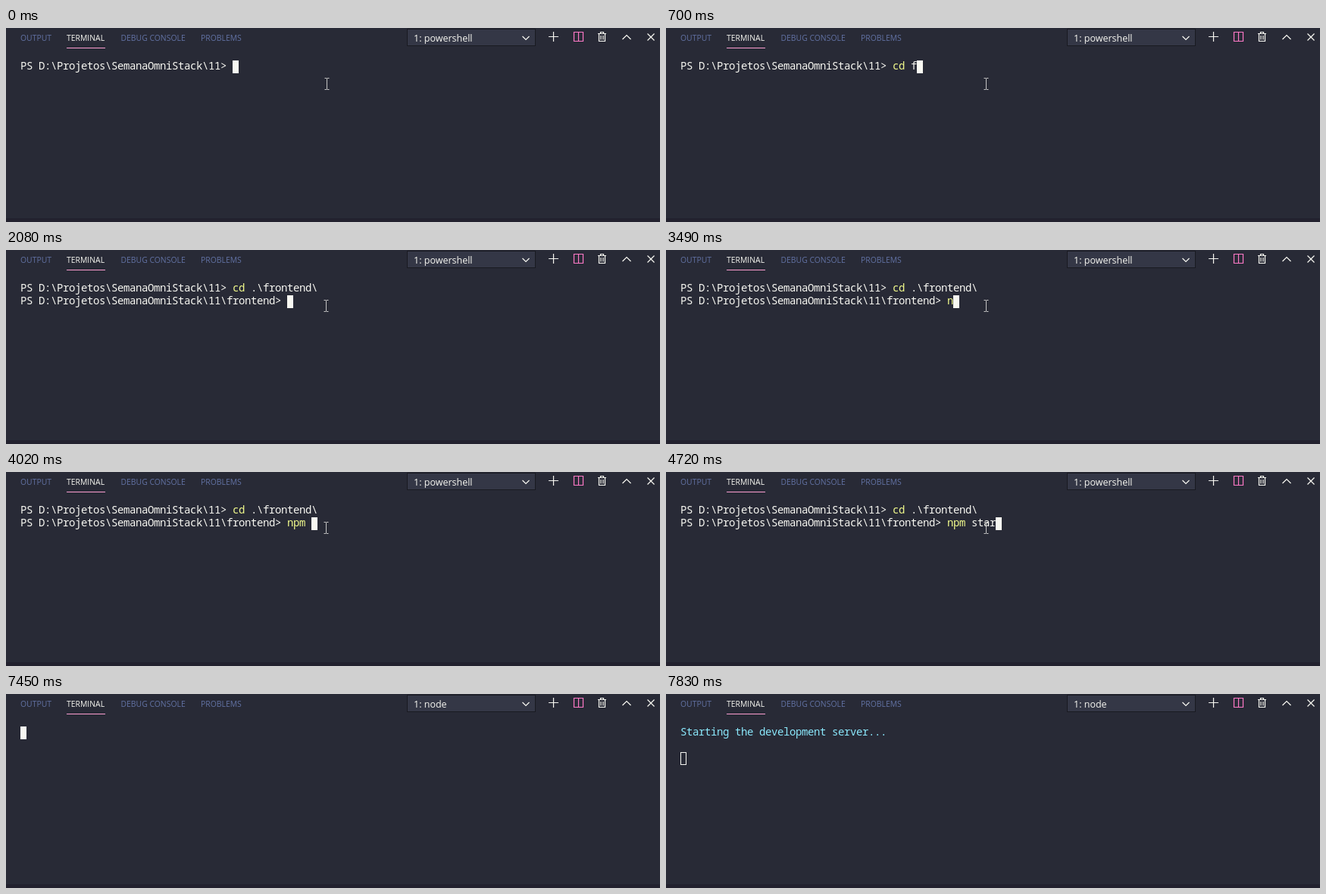
An HTML page that plays this animation: 863x257 px, repeating every 8000 ms.

```html
<!DOCTYPE html>
<html lang="en">
<head>
<meta charset="utf-8">
<title>Terminal</title>
<style>
  html, body { margin: 0; width: 100%; height: 100%; overflow: hidden; background: #282a36; }
  svg { display: block; }
  text { white-space: pre; fill: #f8f8f2; }
  .ui { font-family: "Open Sans", "Noto Sans", sans-serif; }
  .tabs text { font-size: 10.4px; fill: #6272a4; }
  .tabs .active { fill: #f8f8f2; }
  #title { font-size: 12.5px; }
  #screen text { font: 500 14px "Noto Sans Mono", "DejaVu Sans Mono", monospace; }
  .icons { fill: none; stroke: #f8f8f2; stroke-width: 1.2; }
</style>
</head>
<body>
<svg width="863" height="257" viewBox="0 0 863 257">
  <rect width="863" height="257" fill="#282a36"/>
  <rect y="252" width="863" height="5" fill="#22212e"/>
  <g class="ui tabs">
    <text x="19" y="17">OUTPUT</text>
    <text x="80" y="17" class="active">TERMINAL</text>
    <text x="151.5" y="17">DEBUG CONSOLE</text>
    <text x="257" y="17">PROBLEMS</text>
  </g>
  <rect x="80" y="26" width="51" height="1" fill="#ff9fd2"/>
  <rect x="529.5" y="1.5" width="169" height="22" fill="#343746" stroke="#191a21"/>
  <text id="title" class="ui" x="538" y="18"></text>
  <g class="icons">
    <path d="M681.5 11l4.5 4.5 4.5-4.5"/>
    <path d="M722.5 5v13M716 11.5h13"/>
    <path d="M749.5 5.5h12v12h-12zM755.5 5.5v12" stroke="#ff79c6"/>
    <path d="M781 7.5h11M784.5 7V5.5h4V7M782.5 8v9.5h8V8M785 10v5.5M788 10v5.5"/>
    <path d="M813.5 15l5.5-5.5 5.5 5.5"/>
    <path d="M846.5 7.5l9 9M855.5 7.5l-9 9"/>
  </g>
  <g id="screen"></g>
  <rect id="cursor" width="7" height="16" stroke="#f8f8f2"/>
  <path id="mouse" d="M-3 -7.5h2.5l.5 .5l.5 -.5h2.5M0 -7v14M-3 7.5h2.5l.5 -.5l.5 .5h2.5" fill="none" stroke="#c4c4c4"/>
</svg>
<script>
const LOOP = 8000, LEFT = 19, TOP = 43, CELL = 8, ROW = 17;
const WHITE = '#f8f8f2', YELLOW = '#f1fa8c', CYAN = '#8be9fd';
const DIR = 'D:\\Projetos\\SemanaOmniStack\\11';
const $ = id => document.getElementById(id);

// Times at which the typed command grows
const CD = [[70, 'c'], [250, 'cd'], [470, 'cd '], [700, 'cd f'], [1010, 'cd fr'],
  [1240, 'cd fro'], [1470, 'cd .\\frontend\\']];
const NPM = [3490, 3720, 3790, 4020, 4190, 4420, 4570, 4720, 4880]
  .map((time, i) => [time, 'npm start'.slice(0, i + 1)]);

const typed = (steps, t) => steps.reduce((s, [time, text]) => t >= time ? text : s, '');

function prompt(dir, command) {
  const split = (command + ' ').indexOf(' ');
  return [[`PS ${dir}> `, WHITE], [command.slice(0, split), YELLOW], [command.slice(split), WHITE]];
}

// Each line is a list of [text, colour]; the block cursor follows the last line
function linesAt(t) {
  if (t >= 7600) return [[['Starting the development server...', CYAN]], [], []];
  if (t >= 7450) return [[]];
  const lines = [prompt(DIR, typed(CD, t))];
  if (t >= 2080) lines.push(prompt(DIR + '\\frontend', typed(NPM, t)));
  if (t >= 5030) lines.push([]);
  if (t >= 5660) lines.push(
    [[`> frontend@0.1.0 start ${DIR}\\frontend`, WHITE]],
    [['> react-scripts start', WHITE]], [], []);
  return lines;
}

function drawLine(line, row) {
  let col = 0;
  for (const [text, color] of line) {
    const el = document.createElementNS('http://www.w3.org/2000/svg', 'text');
    el.setAttribute('x', [...text].map((_, i) => LEFT + (col + i) * CELL).join(' '));
    el.setAttribute('y', TOP + row * ROW + 12);
    el.style.fill = color;
    el.textContent = text;
    $('screen').append(el);
    col += text.length;
  }
  return col;
}

let shown = '';
function draw(t) {
  const lines = linesAt(t);
  const state = JSON.stringify(lines);
  if (state !== shown) {
    shown = state;
    $('screen').replaceChildren();
    const col = lines.map(drawLine).pop();
    $('cursor').setAttribute('x', LEFT + col * CELL + .5);
    $('cursor').setAttribute('y', TOP + (lines.length - 1) * ROW + .5);
  }
  $('cursor').setAttribute('fill', t < 7830 ? WHITE : 'none');
  $('title').textContent = t < 5260 ? '1: powershell' : '1: node';
  $('mouse').setAttribute('transform', `translate(${t < 70 ? 423.5 : 422.5} 74)`);
  $('mouse').setAttribute('visibility', t < 7450 ? 'visible' : 'hidden');
}

const start = performance.now();
function tick() {
  draw((performance.now() - start) % LOOP);
  requestAnimationFrame(tick);
}
tick();
</script>
</body>
</html>
```
